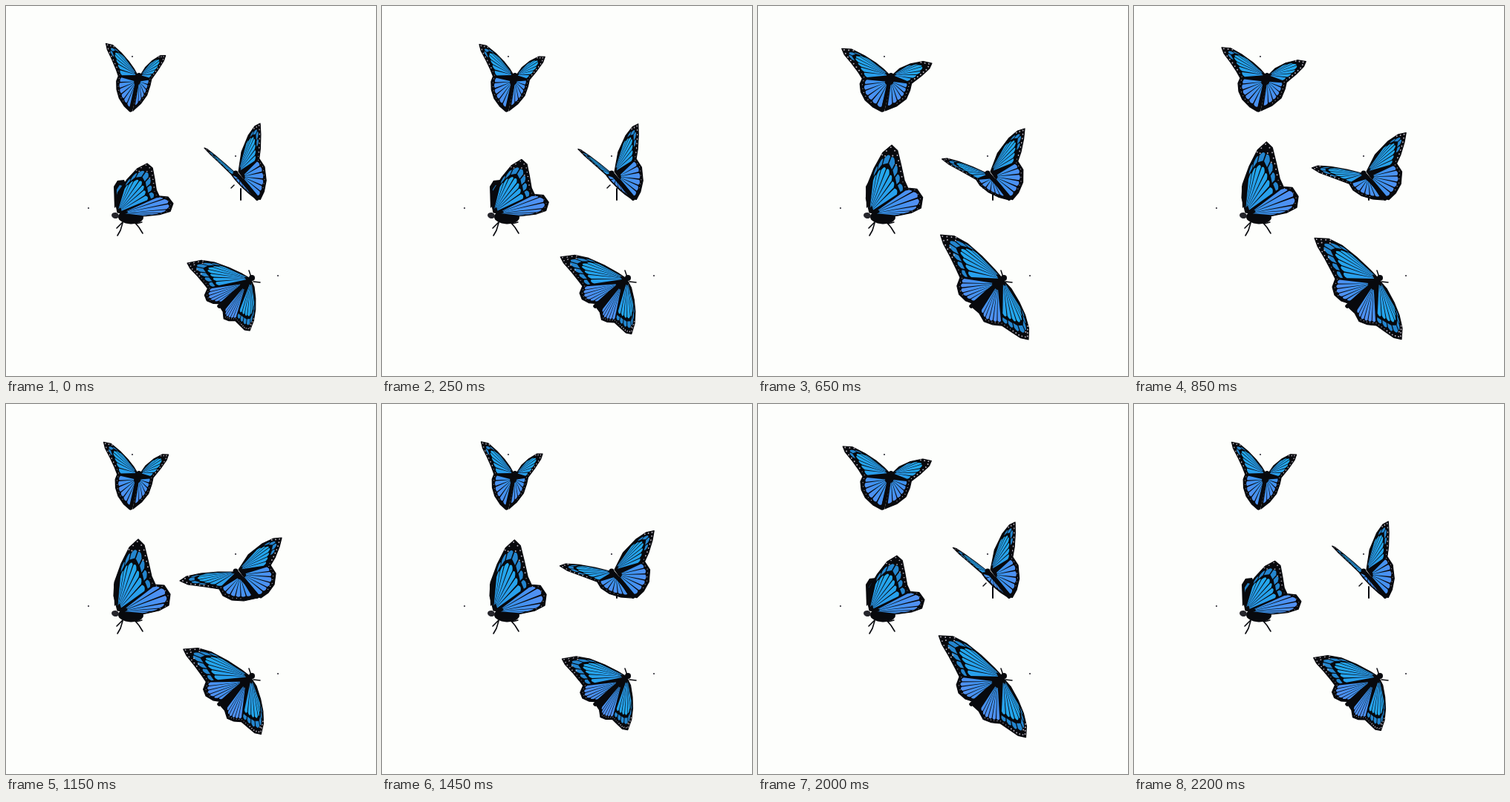
An HTML page with a canvas that plays this animation: 498x498 px, repeating every 2250 ms.

```html
<!DOCTYPE html>
<html lang="en">
<head>
<meta charset="utf-8">
<title>Butterflies</title>
<style>
  html, body { margin: 0; width: 100%; height: 100%; overflow: hidden; background: #fdfefc; }
  canvas { display: block; width: 498px; height: 498px; }
</style>
</head>
<body>
<canvas id="stage" width="498" height="498"></canvas>
<script>
const ctx = document.getElementById('stage').getContext('2d');
const LOOP = 2250, STEP = 50;
const INK = '#08090d';

// ---------- geometry helpers ----------
const pts = (...n) => Array.from({ length: n.length / 2 }, (_, i) => [n[2 * i], n[2 * i + 1]]);
const mix = (p, q, k) => [p[0] + (q[0] - p[0]) * k, p[1] + (q[1] - p[1]) * k];
const dist = (p, q) => Math.hypot(q[0] - p[0], q[1] - p[1]);

// Split a polyline into n pieces of equal length.
function resample(line, n) {
  const seg = line.slice(1).map((p, i) => dist(line[i], p));
  const total = seg.reduce((a, b) => a + b, 0);
  return Array.from({ length: n + 1 }, (_, k) => {
    let d = total * k / n, i = 0;
    while (i < seg.length - 1 && d > seg[i]) d -= seg[i++];
    return mix(line[i], line[i + 1], Math.min(1, d / seg[i]));
  });
}

// Smooth periodic curve through [time, value] keys.
function curve(keys) {
  const n = keys.length;
  const at = i => {
    const turn = Math.floor(i / n), k = keys[i - turn * n];
    return [k[0] + turn * LOOP, k[1]];
  };
  const slope = i => (at(i + 1)[1] - at(i - 1)[1]) / (at(i + 1)[0] - at(i - 1)[0]);
  return t => {
    let i = 0;
    while (at(i + 1)[0] <= t) i++;
    const [t0, v0] = at(i), [t1, v1] = at(i + 1);
    const h = t1 - t0, u = (t - t0) / h, w = 1 - u;
    return v0 * (1 + 2 * u) * w * w + v1 * (3 - 2 * u) * u * u
      + h * (slope(i) * u * w * w - slope(i + 1) * u * u * w);
  };
}

// ---------- wings ----------
// lead: root to tip, edge: tip to notch, hind: notch to tail.
// The wing hinges on the line root-tail; tip(s) says where the tip is.
function wing(root, tail, lead, edge, hind, tip) {
  const fan = resample([...lead.slice(-2), ...edge], 7);
  const skirt = resample([edge[edge.length - 1], ...hind], 6);
  const seat = mix(root, tail, 0.18);
  const margin = resample([lead[lead.length - 1], ...edge, ...hind], 20);
  return { root, tail, fan, skirt, seat, margin, tip, ref: edge[0],
    outline: [root, ...lead, ...edge, ...hind, tail] };
}

function hinge({ root, tail, ref }, tip) {
  const [rx, ry] = root;
  const nx = ry - tail[1], ny = tail[0] - rx;
  const q = nx * (ref[0] - rx) + ny * (ref[1] - ry);
  const dx = (tip[0] - ref[0]) / q, dy = (tip[1] - ref[1]) / q;
  const a = 1 + dx * nx, b = dy * nx, c = dx * ny, d = 1 + dy * ny;
  ctx.setTransform(a, b, c, d, rx - a * rx - c * ry, ry - b * rx - d * ry);
}

function trace(line) {
  ctx.beginPath();
  line.forEach(p => ctx.lineTo(...p));
}

function cell(o, p, q, r0, r1, color) {
  const a = mix(p, q, 0.1), b = mix(p, q, 0.9);
  ctx.beginPath();
  ctx.moveTo(...mix(o, a, r0));
  ctx.lineTo(...mix(o, a, r1));
  ctx.quadraticCurveTo(...mix(o, mix(a, b, 0.5), r1 + 0.07), ...mix(o, b, r1));
  ctx.lineTo(...mix(o, b, r0));
  ctx.fillStyle = color;
  ctx.fill();
}

function shade(from, to, c0, c1) {
  const g = ctx.createLinearGradient(...from, ...to);
  g.addColorStop(0, c0);
  g.addColorStop(1, c1);
  return g;
}

function drawWing(w, s) {
  ctx.save();
  hinge(w, w.tip(s));
  trace(w.outline);
  ctx.closePath();
  ctx.save();
  ctx.setTransform(1, 0, 0, 1, 0, 0);
  ctx.fillStyle = ctx.strokeStyle = INK;
  ctx.lineWidth = 1.2;
  ctx.fill();
  ctx.stroke();
  ctx.restore();

  const sky = shade(w.root, w.ref, '#2c96ea', '#1eb4f0');
  const violet = shade(w.seat, w.skirt[3], '#2f93ea', '#5590f4');
  w.fan.slice(1).forEach((q, i) => {
    const p = w.fan[i], len = dist(w.root, mix(p, q, 0.5));
    const end = 1 - (7 + Math.max(0, len - 38) * 0.42) / len;
    cell(w.root, p, q, 0.1, end, sky);
    if (len > 55) cell(w.root, p, q, end + 0.09, Math.min(0.87, end + 0.19), '#2486cf');
  });
  w.skirt.slice(1).forEach((q, i) => {
    const p = w.skirt[i], len = dist(w.seat, mix(p, q, 0.5));
    cell(w.seat, p, q, 0.12, 1 - 6 / len, violet);
  });

  ctx.fillStyle = '#b9b2bd';
  w.margin.slice(0, -3).forEach((p, i) => {
    const len = dist(w.root, p);
    dot(mix(p, w.root, 3 / len), i < 9 ? 0.95 : 0.6);
    if (len > 80 && i % 2) dot(mix(p, w.root, 0.11), 1);
  });
  ctx.restore();
}

function dot(p, r) {
  ctx.beginPath();
  ctx.arc(...p, r, 0, 7);
  ctx.fill();
}

function line(width, ...n) {
  trace(pts(...n));
  ctx.lineWidth = width;
  ctx.strokeStyle = INK;
  ctx.stroke();
}

function blob(x, y, rx, ry, turn, color = INK) {
  ctx.beginPath();
  ctx.ellipse(x, y, rx, ry, turn, 0, 7);
  ctx.fillStyle = color;
  ctx.fill();
}

// ---------- the four butterflies ----------
const arc = s => 0.68 * (1 - Math.sqrt(Math.max(0, 1 - s * s))) + 0.32 * s;

const top1 = wing([177, 93], [168, 142],
  pts(170, 85, 160, 76, 146, 66, 130, 57),
  pts(118, 56, 121, 64, 130, 76, 138, 88, 143, 97),
  pts(140, 104, 141, 115, 146, 126, 156, 136, 166, 142),
  s => [136 - 25 * s, 50 + 8 * s]);
const top2 = wing([181, 93], [171, 141],
  pts(190, 84, 204, 77, 220, 73),
  pts(231, 75, 228, 82, 218, 92, 205, 103),
  pts(203, 112, 198, 124, 186, 134, 173, 140),
  s => [212.5 + 37 * s - 15 * s * s, 66 + 12 * s]);

const right1 = wing([310, 226], [338, 261],
  pts(300, 226, 285, 226, 262, 228, 243, 232),
  pts(234, 238, 245, 243, 268, 246, 287, 249),
  pts(292, 258, 304, 264, 320, 265, 334, 262),
  s => [267 - 33 * s, 191 + 47 * arc(s)]);
const right2 = wing([313, 223], [340, 260],
  pts(326, 203, 345, 188, 360, 181),
  pts(371, 180, 368, 192, 362, 207, 356, 217),
  pts(363, 228, 361, 243, 353, 254, 343, 261),
  s => [342 + 29 * s, 158 + 22 * arc(s)]);

const left1 = wing([150, 278], [182, 283],
  pts(145, 258, 146, 240, 155, 215, 166, 193),
  pts(178, 182, 186, 190, 191, 210, 196, 232, 201, 243),
  pts(213, 244, 221, 256, 219, 271, 206, 278, 188, 282),
  s => [190 - 12 * s, 212 - 30 * s]);

const low1 = wing([329, 367], [286, 404],
  pts(318, 355, 300, 338, 280, 322, 262, 313),
  pts(243, 312, 247, 323, 257, 340, 266, 357, 271, 367),
  pts(267, 378, 270, 389, 279, 397, 288, 400),
  s => [244 - 24.8 * s + 28.8 * s * s, 346 - 41 * s]);
const low2 = wing([330, 369], [288, 405],
  pts(340, 380, 350, 398, 357, 415, 361, 432),
  pts(360, 447, 350, 445, 338, 437, 326, 429),
  pts(314, 428, 303, 424, 297, 413),
  s => [328 + 39 * s, 437 + 24 * s - 12 * s * s]);

const topFlap = curve([[0, .06], [250, .2], [500, .53], [700, 1], [850, .72], [1150, .18],
  [1300, .08], [1450, .1], [1650, .42], [1800, .68], [1930, 1.02], [2200, .18]]);
const lowFlap = curve([[0, 0], [250, .2], [500, .54], [700, 1], [850, .82], [1150, .39],
  [1450, .07], [1650, .4], [1800, .75], [1930, 1], [2200, .11]]);
const slowFlap = t => (1 - Math.cos((t - 25) / LOOP * 2 * Math.PI)) / 2;

function drawTop(s) {
  drawWing(top1, s);
  drawWing(top2, s);
  line(5, 178, 96, 173, 118, 168, 140);
  blob(179, 94, 3.4, 4, 0);
}

function drawRight(s) {
  line(2, 316, 246, 316, 261);
  line(1.5, 307, 241, 303, 245);
  drawWing(right1, s);
  drawWing(right2, s);
  line(5.5, 311, 227, 325, 243, 338, 259);
  blob(309, 225, 3.5, 3.5, 0);
}

function drawLeft(s) {
  line(1.6, 158, 290, 149, 299);
  line(1.6, 157, 292, 154, 302, 150, 309);
  line(1.6, 173, 291, 179, 298, 184, 306);
  line(1.4, 175, 293, 183, 291);
  trace(pts(146, 272, 145, 243, 150, 235, 159, 234, 166, 252));
  ctx.fillStyle = INK;
  ctx.fill();
  trace(pts(149, 262, 149, 247, 153, 241, 157, 242));
  ctx.fillStyle = '#237fc4';
  ctx.fill();
  blob(168, 284, 17, 9.5, 0.03);
  blob(147, 282, 5, 4, 0.2, '#25252b');
  drawWing(left1, 1 - (1 - s) ** 2);
}

function drawLow(s) {
  line(1.5, 330, 365, 327, 356);
  line(1.5, 333, 371, 342, 372);
  drawWing(low1, s);
  drawWing(low2, s);
  line(5.5, 328, 369, 306, 387, 287, 404);
  blob(331, 366, 4, 4, 0);
}

function draw(t) {
  ctx.fillStyle = '#fdfefc';
  ctx.fillRect(0, 0, 498, 498);
  ctx.fillStyle = '#303038';
  pts(170, 68, 309, 202, 111, 272, 366, 363).forEach(p => dot(p, 1.1));
  drawTop(topFlap(t));
  drawRight(slowFlap(t));
  drawLeft(slowFlap(t));
  drawLow(lowFlap(t));
}

ctx.lineJoin = ctx.lineCap = 'round';
const start = performance.now();
function tick() {
  const t = (performance.now() - start) % LOOP;
  draw(Math.floor(t / STEP) * STEP);
  requestAnimationFrame(tick);
}
tick();
</script>
</body>
</html>
```
